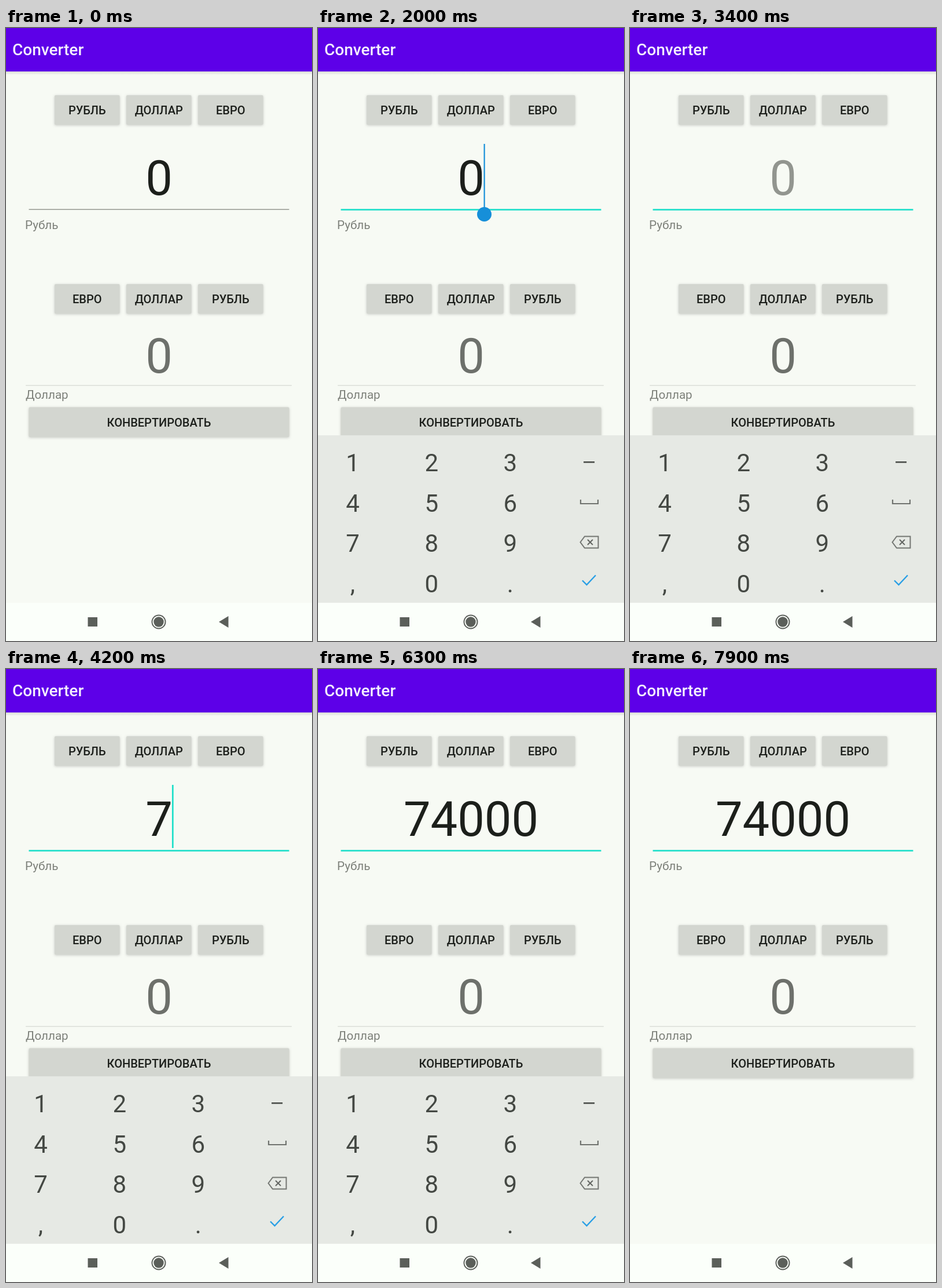
Recreate the animation shown at these times as an HTML page with a canvas. Size 529 px wide and 1058 px high, loop 8 s.

```html
<!DOCTYPE html>
<html lang="ru">
<head>
<meta charset="utf-8">
<title>Converter</title>
<style>
  html, body { margin: 0; width: 100%; height: 100%; overflow: hidden; background: #f7faf4; }
  canvas { display: block; width: 529px; height: 1058px; }
</style>
</head>
<body>
<canvas id="stage" width="529" height="1058"></canvas>
<script>
const ctx = document.getElementById('stage').getContext('2d');
const W = 529, H = 1058, LOOP = 8000, STEP = 100;
const CENTER = 264.5, NAV_TOP = 992, KEYS_TOP = 703;
const TEAL = '#1bdfc9', BLUE = '#168fd9', INK = '#1c1f1b', ICON = '#5b5f5a';

const FOCUS = 1600, HANDLE_END = 2900, BLINK = 500;
const SHOW = [1600, 1900], HIDE = [6800, 7100];

// Each edit: time, resulting text, pressed key as [column, row].
const EDITS = [
  [2900, '', [3, 2]],
  [3900, '7', [0, 2]],
  [4400, '74', [0, 1]],
  [4900, '740', [1, 3]],
  [5200, '7400', [1, 3]],
  [5400, '74000', [1, 3]]
];
const KEYS = ['123', '456', '789', ',0.'];
const keyX = col => 60 + col * 136.2;
const keyY = row => 750 + row * 69.7;

const clamp = v => Math.max(0, Math.min(1, v));
const easeOut = v => 1 - (1 - clamp(v)) ** 3;
const progress = (t, [start, end]) => easeOut((t - start) / (end - start));

function rect(x, y, w, h, color) {
  ctx.fillStyle = color;
  ctx.fillRect(x, y, w, h);
}

function text(str, x, y, size, color, align = 'center', weight = 400) {
  ctx.font = `${weight} ${size}px Roboto, sans-serif`;
  ctx.textAlign = align;
  ctx.fillStyle = color;
  ctx.fillText(str, x, y);
}

function stroke(points, color, width, closed = false) {
  ctx.beginPath();
  points.forEach(([x, y]) => ctx.lineTo(x, y));
  if (closed) ctx.closePath();
  ctx.strokeStyle = color;
  ctx.lineWidth = width;
  ctx.stroke();
}

function circle(x, y, r, color) {
  ctx.beginPath();
  ctx.arc(x, y, r, 0, Math.PI * 2);
  ctx.fillStyle = color;
  ctx.fill();
}

function button(label, x, y, w, h) {
  ctx.save();
  ctx.shadowColor = 'rgba(0,0,0,.2)';
  ctx.shadowBlur = 4;
  ctx.shadowOffsetY = 1;
  ctx.beginPath();
  ctx.roundRect(x, y, w, h, 2);
  ctx.fillStyle = '#d3d6d0';
  ctx.fill();
  ctx.restore();
  text(label, x + w / 2, y + h / 2 + 7.5, 20, INK, 'center', 500);
}

function buttonRow(labels, y) {
  labels.forEach((label, i) => button(label, 84 + i * 124, y, 112.5, 51));
}

function drawHeader() {
  const shade = ctx.createLinearGradient(0, 75, 0, 81);
  shade.addColorStop(0, 'rgba(0,0,0,.12)');
  shade.addColorStop(1, 'rgba(0,0,0,0)');
  rect(0, 75, W, 6, shade);
  rect(0, 0, W, 75, '#5d00e8');
  text('Converter', 11, 46.5, 28, '#f4effd', 'left', 500);
}

function drawInput(t) {
  const edit = EDITS.filter(([at]) => at <= t).pop();
  const value = edit ? edit[1] : '0';
  text(value || '0', CENTER, 287.5, 83, value ? INK : '#92958f');

  if (t < FOCUS) {
    rect(39.5, 312.5, 450, 1.3, '#858982');
    return;
  }
  rect(39.5, 312.3, 450, 2.6, TEAL);

  const half = ctx.measureText(value).width / 2;
  if (!edit) {
    rect(286.5, 200, 2.2, 113, BLUE);
    circle(287.5, 321.5, 12.5, BLUE);
  } else if ((t - edit[0]) % (2 * BLINK) < BLINK) {
    const x = value ? CENTER + half : CENTER - 23;
    rect(x - 0.9, 200, 2.7, 109, TEAL);
  }
}

function drawForm(t) {
  buttonRow(['РУБЛЬ', 'ДОЛЛАР', 'ЕВРО'], 116);
  drawInput(t);
  text('Рубль', 33, 347, 20.6, '#7d807a', 'left');

  buttonRow(['ЕВРО', 'ДОЛЛАР', 'РУБЛЬ'], 442);
  text('0', CENTER, 594.5, 83, '#6d706b');
  rect(34, 616, 460, 1.8, '#e0e3dd');
  text('Доллар', 34, 640, 20.6, '#7d807a', 'left');
  button('КОНВЕРТИРОВАТЬ', 39.5, 654.5, 450, 51.5);
}

function drawKeyIcons() {
  const x = keyX(3);
  rect(x - 9.5, 748, 19, 2.6, '#4b4e4a');
  stroke([[454, 814], [454, 821], [484, 821], [484, 814]], '#70736f', 2.2);
  stroke([[453.5, 887.5], [461, 877.5], [484.5, 877.5], [484.5, 897.5], [461, 897.5]],
    '#747773', 2, true);
  stroke([[466, 883], [475, 892]], '#626561', 2);
  stroke([[475, 883], [466, 892]], '#626561', 2);
  stroke([[457, 953.5], [464.5, 961], [480, 944.5]], '#299fe5', 2.4);
}

function drawKeyboard(t) {
  const shown = progress(t, SHOW) - progress(t, HIDE);
  if (shown <= 0) return;
  ctx.save();
  ctx.translate(0, (1 - shown) * (NAV_TOP - KEYS_TOP));
  rect(0, KEYS_TOP, W, NAV_TOP - KEYS_TOP, '#e6e9e4');

  const pressed = EDITS.find(([at]) => t >= at && t < at + 200);
  if (pressed) {
    const [col, row] = pressed[2];
    rect(keyX(col) - 67, keyY(row) - 36, 134, 69, '#c2c6c1');
  }
  KEYS.forEach((line, row) => [...line].forEach((key, col) =>
    text(key, keyX(col), keyY(row) + 15, 42, '#444843')));
  drawKeyIcons();
  ctx.restore();
}

function drawNavigation() {
  rect(0, NAV_TOP, W, H - NAV_TOP, '#fbfffa');
  rect(141.5, 1017, 16.5, 16, ICON);
  circle(264, 1025, 12.5, ICON);
  circle(264, 1025, 10.6, '#fbfffa');
  circle(264, 1025, 8.7, ICON);
  ctx.beginPath();
  ctx.moveTo(368, 1025);
  ctx.lineTo(384.5, 1015);
  ctx.lineTo(384.5, 1035);
  ctx.fillStyle = ICON;
  ctx.fill();
}

function draw(now) {
  const t = Math.floor((now % LOOP) / STEP) * STEP;
  rect(0, 0, W, H, '#f7faf4');
  drawHeader();
  drawForm(t);
  drawKeyboard(t);
  drawNavigation();
  requestAnimationFrame(draw);
}
requestAnimationFrame(draw);
</script>
</body>
</html>
```
